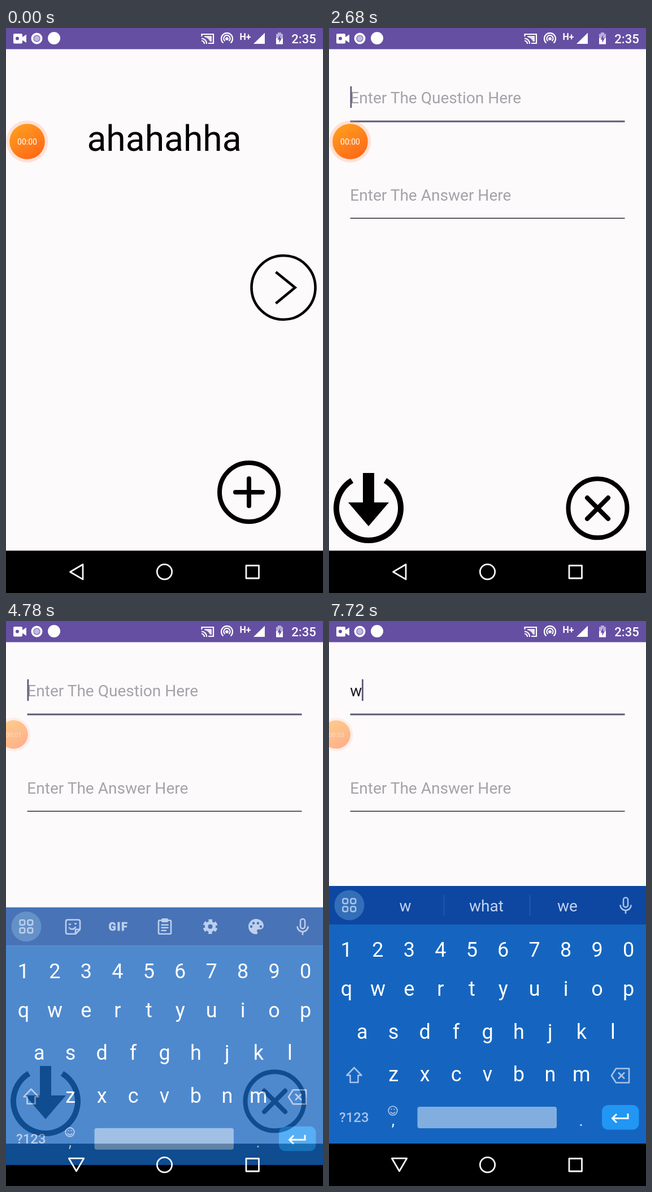
Recreate the animation shown at these times as an HTML page. Size 561 by 998 pixels, loop 8 s.

```html
<!DOCTYPE html>
<html lang="en">
<head>
<meta charset="utf-8">
<title>Question form</title>
<style>
  html, body { margin: 0; width: 100%; height: 100%; overflow: hidden; background: #000; }
  svg { display: block; width: 100vw; height: 100vh; }
  text { font-family: Roboto, sans-serif; white-space: pre; }
  .line { fill: none; stroke: #000; }
  .round { stroke-linecap: round; stroke-linejoin: round; }
  .mid { text-anchor: middle; }
  .hint { font-size: 28.05px; fill: #a5a2a8; }
  .soft { fill: #a9c2e8; }
  .softLine { fill: none; stroke: #a9c2e8; stroke-width: 2.6; }
  .keys { font-size: 36px; fill: #fff; text-anchor: middle; }
  .word { font-size: 28px; fill: #c2d3ee; text-anchor: middle; }
</style>
</head>
<body>
<svg viewBox="0 0 561 998" preserveAspectRatio="none">
  <defs>
    <linearGradient id="orange" x1="0.2" y1="0" x2="0.8" y2="1">
      <stop offset="0" stop-color="#ff9f1f"/><stop offset="1" stop-color="#ff6618"/>
    </linearGradient>
    <g id="window">
      <rect width="561" height="998" fill="#fdfafc"/>
      <rect width="561" height="37.4" fill="#654fa2"/>
      <rect y="923.2" width="561" height="74.8"/>
    </g>
  </defs>

  <g id="home">
    <use href="#window"/>
    <text class="mid" x="280" y="217" font-size="62.4">ahahahha</text>
    <g class="line" stroke-width="4.6">
      <circle cx="491" cy="458.5" r="56.5"/>
      <path d="M477.5 431L511.5 458.5L477.5 486.5"/>
    </g>
    <g class="line round" stroke-width="8">
      <circle cx="430" cy="820" r="52"/>
      <path d="M406 820H454M430 796V844"/>
    </g>
  </g>

  <g id="form">
    <use href="#window"/>
    <text id="question" class="hint" x="37.3" y="133"></text>
    <text class="hint" x="37.3" y="304.5">Enter The Answer Here</text>
    <rect x="37.5" y="163.5" width="486" height="3" fill="#5d5a73"/>
    <rect x="37.5" y="335.2" width="486" height="1.7" fill="#45414d"/>
    <rect id="cursor" y="103" width="2.8" height="38" fill="#5f5b78"/>
    <path class="line" stroke-width="10" d="M40.6 799.2A57 57 0 1 0 99.4 799.2"/>
    <path d="M60 786H80V838H106L70 880L34 838H60Z"/>
    <g class="line round" stroke-width="8">
      <circle cx="475.5" cy="848.3" r="52"/>
      <path d="M457 829.8L494 866.8M494 829.8L457 866.8"/>
    </g>
  </g>

  <g id="keyboard">
    <rect y="468" width="561" height="68" fill="#0d47a1"/>
    <rect y="536" width="561" height="387.2" fill="#1565c0"/>
    <rect y="923.2" width="561" height="120"/>
    <circle cx="36" cy="502" r="26.5" fill="#336fb8"/>
    <g class="softLine">
      <rect x="24.5" y="490.5" width="8.6" height="8.6" rx="2.5"/>
      <rect x="38.5" y="490.5" width="8.6" height="8.6" rx="2.5"/>
      <rect x="24.5" y="504.5" width="8.6" height="8.6" rx="2.5"/>
      <rect x="38.5" y="504.5" width="8.6" height="8.6" rx="2.5"/>
    </g>
    <g id="tools">
      <path class="softLine round" d="M109 490H128Q131 490 131 493V507L123 515H109Q106 515 106 512V493Q106 490 109 490ZM123 515V507H131M112 504Q117 510 123 503"/>
      <path class="softLine" d="M111 498H115M121 497H125"/>
      <text class="soft" x="181.5" y="509" font-size="19.5" font-weight="900" letter-spacing="1.7" stroke="#a9c2e8" stroke-width="0.6">GIF</text>
      <path class="softLine round" d="M272 491H290Q292 491 292 493V513Q292 515 290 515H272Q270 515 270 513V493Q270 491 272 491ZM275.5 499H286.5M275.5 504H286.5M275.5 509H283"/>
      <rect class="soft" x="275" y="487.5" width="12" height="7" rx="2"/>
      <g fill="none" stroke="#a9c2e8">
        <circle cx="361.5" cy="502" r="6.8" stroke-width="5.6"/>
        <circle cx="361.5" cy="502" r="11" stroke-width="4" stroke-dasharray="6.5 5.02" stroke-dashoffset="-2.5"/>
      </g>
      <path class="soft" d="M442.5 488.5A13.5 13.5 0 1 0 442.5 515.5C446 515.5 445.5 512 444.5 511C443 508.5 445 507 447 507H450C453 507 456 504 456 500.5C456 493.5 450 488.5 442.5 488.5Z"/>
      <g fill="#0d47a1"><circle cx="434" cy="502" r="2.2"/><circle cx="438" cy="496" r="2.2"/><circle cx="446" cy="496" r="2.2"/><circle cx="451" cy="502" r="2.2"/></g>
    </g>
    <g id="words">
      <text class="word" x="135" y="513">w</text>
      <text class="word" x="278.5" y="513">what</text>
      <text class="word" x="422" y="513">we</text>
      <path d="M203.5 484V521M355.5 484V521" stroke="#2a5cb0" stroke-width="1.5"/>
    </g>
    <g class="softLine">
      <rect x="521" y="488.5" width="8" height="17" rx="4"/>
      <path d="M515.5 501.5A9.5 9.5 0 0 0 534.5 501.5M525 511V517"/>
    </g>
    <g id="keys" class="keys"></g>
    <g class="softLine" stroke-linejoin="round">
      <path d="M44.5 789L57.5 802.5H51.5V815H37.5V802.5H31.5Z"/>
      <path d="M508 790.5H531V815.5H508L500 803ZM512 797.5L523 808.5M523 797.5L512 808.5"/>
    </g>
    <text class="soft" x="18" y="885" font-size="24" font-weight="500">?123</text>
    <g class="softLine" style="stroke-width:1.8">
      <circle cx="113" cy="865" r="7.8"/>
      <path d="M108.5 867Q113 872.5 117.5 867M109.5 862.5H111.5M114.5 862.5H116.5"/>
    </g>
    <text class="mid" x="113.5" y="891" font-size="27" fill="#fff">,</text>
    <text class="mid" x="446" y="892" font-size="29" fill="#d5e3f6">.</text>
    <rect x="156.5" y="858" width="246.5" height="38" rx="4" fill="#82aedf"/>
    <rect x="483" y="855" width="65.5" height="43.5" rx="11" fill="#2196f3"/>
    <path d="M529 870V878.5H502M509 871L501.5 878.5L509 886" fill="none" stroke="#fff" stroke-width="3"/>
  </g>

  <g fill="#fff">
    <path d="M15 10H27Q29 10 29 12V16L36 11.5V26L29 21.5V25.5Q29 27.5 27 27.5H15Q13 27.5 13 25.5V12Q13 10 15 10Z"/>
    <circle cx="20" cy="18.5" r="3" fill="#654fa2"/>
    <circle cx="54.5" cy="18.5" r="10"/>
    <circle cx="54.5" cy="18.5" r="5.5" fill="#c3b8e0" stroke="#8b78bd" stroke-width="1.5"/>
    <circle cx="85" cy="18" r="11"/>
    <g fill="none" stroke="#fff" stroke-width="2.2">
      <path d="M346.5 15V11H367V27H358M346 18.5A9 9 0 0 1 355 28M346 22.5A5 5 0 0 1 351 28"/>
      <path d="M384.5 26.5A10 10 0 1 1 397.5 26.5M387.5 23A5.7 5.7 0 1 1 394.5 23"/>
    </g>
    <path d="M351 14H364V24H361Q358 17 351 16Z" opacity="0.85"/>
    <circle cx="391" cy="19" r="2.8"/>
    <text x="413.5" y="21" font-size="16" font-weight="700">H+</text>
    <path d="M458 8.5V28H438Z"/>
    <path d="M481 8H487V10.5H490V28.5H478V10.5H481Z" fill="#b9addb"/>
    <path d="M478 18H490V28.5H478Z"/>
    <path d="M485.5 12L480.5 20.5H483.5V26L488 18H485Z" fill="#654fa2"/>
    <text x="505.3" y="27.3" font-size="22" font-weight="500">2:35</text>
  </g>

  <g fill="none" stroke="#f8f6f8" stroke-width="2.8" stroke-linejoin="round">
    <path id="back" d="M113.5 960.7L136 947.5V973.9Z"/>
    <circle cx="280.5" cy="960.6" r="13.2"/>
    <rect x="425" y="949.5" width="22.5" height="22.5"/>
  </g>

  <g id="bubble">
    <circle r="37" fill="#ff8a50" opacity="0.22"/>
    <circle r="31.3" fill="url(#orange)"/>
    <text id="timer" class="mid" y="5" font-size="14" fill="#fff"></text>
  </g>
</svg>

<script>
const $ = id => document.getElementById(id);
const LOOP = 8000, OPEN = 1914, TYPED = 7000;
const KEY_PITCH = 55.45, CENTER = 280.5;

const rows = [
  ["1234567890", 593], ["qwertyuiop", 662],
  ["asdfghjkl", 737.5], ["zxcvbnm", 813]
];
$("keys").innerHTML = rows.map(([chars, y]) =>
  [...chars].map((c, i) =>
    `<text x="${CENTER + (i - (chars.length - 1) / 2) * KEY_PITCH}" y="${y}">${c}</text>`
  ).join("")).join("");

const progress = (t, start, length) => Math.min(1, Math.max(0, (t - start) / length));
// Decelerating curve; higher powers brake harder.
const easeOut = (p, power) => 1 - (1 - p) ** power;
const show = (id, visible) => $(id).setAttribute("display", visible ? "inline" : "none");
const place = (id, transform, opacity = 1) => {
  $(id).setAttribute("transform", transform);
  $(id).setAttribute("opacity", opacity);
};
const within = (t, spans) => spans.some(([from, to]) => t >= from && t < to);

function draw(t) {
  const typed = t >= TYPED;

  show("form", t >= OPEN);
  place("form", `translate(0 ${80 * (1 - easeOut(progress(t, OPEN, 350), 5))})`,
    easeOut(progress(t, OPEN, 200), 4));

  $("question").textContent = typed ? "w" : "Enter The Question Here";
  $("question").style.fill = typed ? "#1c1b1f" : "";
  $("cursor").setAttribute("x", typed ? 58 : 37.5);
  show("cursor", within(t, [[OPEN, 2940], [3520, 4040], [4340, 5720], [6460, LOOP]]));

  show("keyboard", t >= 4546);
  place("keyboard", `translate(0 ${120 * (1 - easeOut(progress(t, 4620, 420), 2.39))})`,
    easeOut(progress(t, 4546, 800), 4));
  show("tools", !typed);
  show("words", typed);
  place("back", `rotate(${-90 * progress(t, 4560, 140)} 124.5 960.7)`);

  const dock = easeOut(progress(t, 3640, 1360), 2);
  const fade = 1 - 0.5 * progress(t, 3520, 280);
  place("bubble", `translate(${37.5 - 24.5 * dock} 200.5) scale(${1 - 0.2 * dock})`, fade);
  $("timer").setAttribute("opacity", fade);
  $("timer").textContent = "00:0" + [2940, 6600, 7720].filter(at => t >= at).length;
}

const begin = performance.now();
function tick() {
  draw((performance.now() - begin) % LOOP);
  requestAnimationFrame(tick);
}
tick();
</script>
</body>
</html>
```
